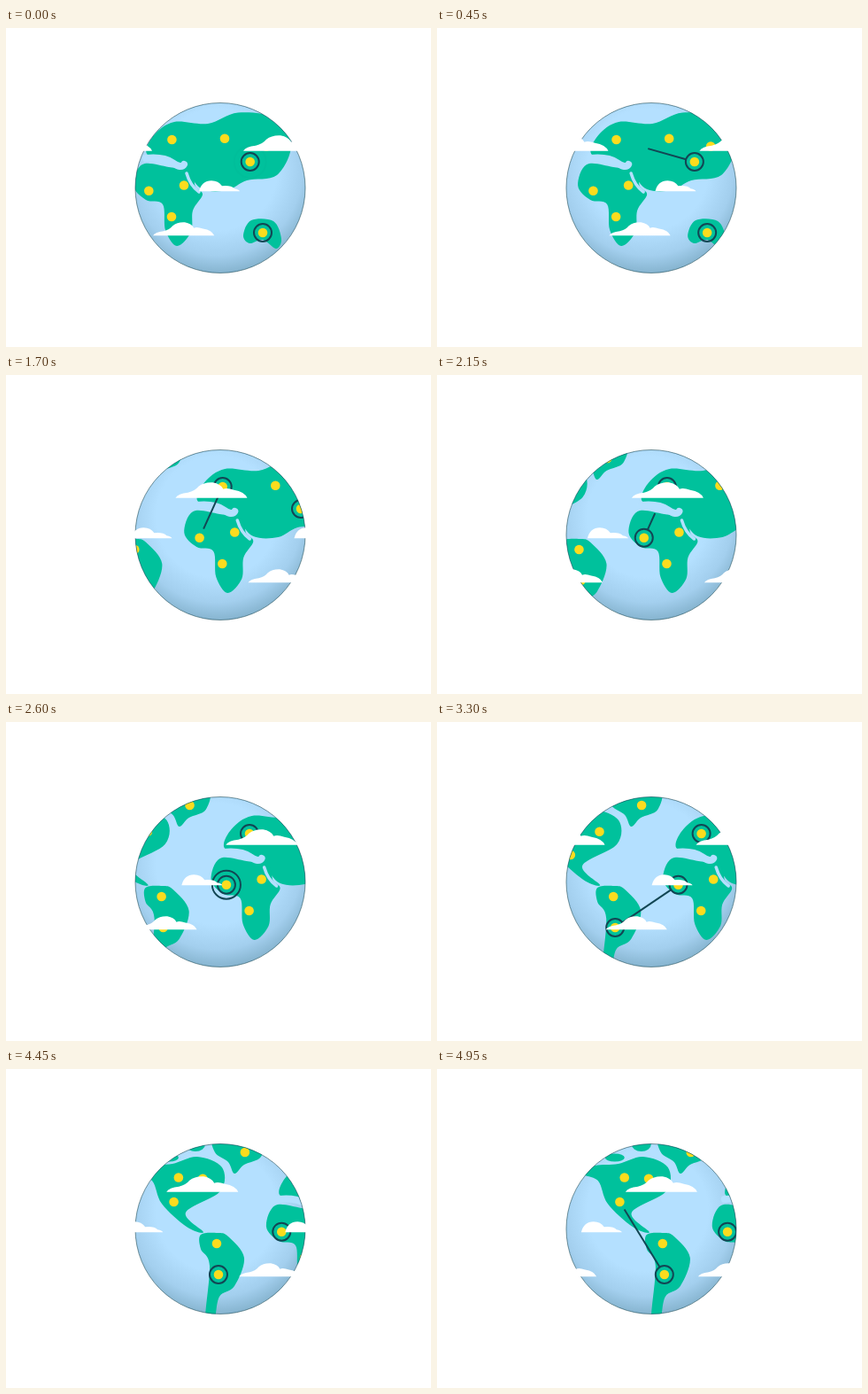
An HTML page with a canvas that plays this animation: 480x360 px, repeating every 5000 ms.

```html
<!DOCTYPE html>
<html lang="en">
<head>
<meta charset="utf-8">
<title>Spinning globe</title>
<style>
  html, body { margin: 0; width: 100%; height: 100%; overflow: hidden; background: #fff; }
  canvas { display: block; }
</style>
</head>
<body>
<canvas id="stage" width="480" height="360"></canvas>
<script>
const ctx = document.getElementById('stage').getContext('2d');
const LOOP = 5000, STEP = 50;
const MAP_SPEED = 0.0337, CLOUD_SPEED = 0.0632, CLOUD_GAP = 184;
const INK = '#124654', LAND = '#00c19c', SEA = '#b4e0ff', YELLOW = '#fbdc1e';
const DOT = 5.3, RING = 10, GROW = 450, HOLD = 200;
const RIPPLE_DELAY = 777, RIPPLE_TIME = 225;
const clamp = v => Math.max(0, Math.min(1, v));

// Smooth closed curve through a few key points, given as x, y, x, y...
function blob(...v) {
  const n = v.length / 2;
  const at = i => { i = (i + n) % n; return [v[2 * i], v[2 * i + 1]]; };
  const path = new Path2D();
  path.moveTo(...at(0));
  for (let i = 0; i < n; i++) {
    const [a, b, c, d] = [at(i - 1), at(i), at(i + 1), at(i + 2)];
    path.bezierCurveTo(
      b[0] + (c[0] - a[0]) / 6, b[1] + (c[1] - a[1]) / 6,
      c[0] - (d[0] - b[0]) / 6, c[1] - (d[1] - b[1]) / 6, ...c);
  }
  return path;
}

function ellipse(x, y, rx, ry = rx) {
  const path = new Path2D();
  path.ellipse(x, y, rx, ry, 0, 0, 2 * Math.PI);
  return path;
}

const eurasia = blob(159,142, 167,121, 190,106, 228,108, 262,95.5, 304,102, 322,132,
  306,166, 272,172, 250,183, 222,182, 204,163, 184,149);
const africa = blob(154,154, 184,157, 209,162, 214,179, 222,188, 211,206, 209,230,
  193,246, 180,228, 177,199, 158,194, 144,178);
const australia = blob(268,234, 277,217, 302,218, 311,238, 305,249, 290,239, 275,243);
const northAmerica = blob(-5,118, 12,109, 38,107, 66,99, 94,111, 92,138, 53,162, 73,184,
  54,178, 26,152, 15,126);
const southAmerica = blob(70,187, 89,185, 101,189, 119,213, 108,245, 91,257, 85,285,
  75,285, 80,222, 70,203);
const greenland = blob(87,76, 86,94, 101,105, 108,118, 119,108, 138,99, 139,76);
const lands = [eurasia, africa, australia, northAmerica, southAmerica, greenland,
  ellipse(34, 100, 11, 4.5), ellipse(64, 85, 11, 8)];

const mediterranean = new Path2D('M158 147Q178 145 188 152T201 154');
const redSea = new Path2D('M204 164Q208 178 218 185');

// Route stops: x, y, arrival time.
const stops = [
  [290, 231, -2000], [275.7, 151, -1000], [187.4, 126, 620],
  [161.3, 183.7, 1710], [90, 232, 3150], [39.6, 150, 4950]
];
const towns = [[247, 124.7], [294, 133.5], [201, 177.5], [187, 213],
  [44.9, 122.5], [72.3, 123.8], [88, 197], [119.9, 94]];

const bigCloud = new Path2D(
  'M0 0Q3-5 14-6Q22-8 26-13Q32-18 42-17.5Q51-16 54-10Q58-12 66-9Q78-7 81 0Z');
const smallCloud = new Path2D('M0 0Q3-12 14-12Q22-12 26-6Q36-7 40-3Q45-2 46 0Z');
const clouds = [[bigCloud, 84, 138.8, 1], [smallCloud, 218, 184.3, 1], [bigCloud, 166, 234.3, 0.855]];

const globe = ellipse(242, 180.5, 96);
const water = ctx.createRadialGradient(238, 160, 0, 238, 160, 118);
water.addColorStop(0.58, SEA);
water.addColorStop(0.82, '#a3cfee');
water.addColorStop(1, '#84b2cd');

function stroke(path, color, width) {
  ctx.strokeStyle = color;
  ctx.lineWidth = width;
  ctx.stroke(path);
}

// A stop's ring opens on arrival; later it ripples away and a new one follows.
function drawRings([x, y, arrive], time) {
  const ring = (r, open) => stroke(ellipse(x, y, r * open + 4 * (1 - open)), INK, 2);
  const u = (time - arrive - RIPPLE_DELAY) / RIPPLE_TIME;
  if (time <= arrive) return;
  if (u <= 0 || u >= 1) return ring(RING, clamp((time - arrive) / 150));
  const spread = 1 - (1 - u) ** 2;
  ring(RING, clamp(2 * spread - 0.5));
  ctx.globalAlpha = Math.min(1, 2 - 2 * u);
  ring(RING + 8 * spread, 1);
  ctx.globalAlpha = 1;
}

// The line grows towards the next stop, waits, then its tail follows.
function drawLeg([x1, y1], [x2, y2, arrive], time) {
  const head = clamp((time - arrive + GROW) / GROW);
  const tail = clamp((time - arrive - HOLD) / GROW);
  if (head <= tail) return;
  const dx = x2 - x1, dy = y2 - y1, length = Math.hypot(dx, dy);
  const point = k => {
    const f = (RING + k * (length - 2 * RING)) / length;
    return [x1 + dx * f, y1 + dy * f];
  };
  const line = new Path2D();
  line.moveTo(...point(tail));
  line.lineTo(...point(head));
  stroke(line, INK, 2);
}

function drawMap(time) {
  ctx.translate(time * MAP_SPEED, 0);
  ctx.fillStyle = LAND;
  lands.forEach(land => ctx.fill(land));
  ctx.lineCap = 'round';
  stroke(mediterranean, SEA, 8);
  stroke(redSea, SEA, 3.5);
  ctx.lineCap = 'butt';
  stops.forEach((stop, i) => {
    if (i) drawLeg(stops[i - 1], stop, time);
    drawRings(stop, time);
  });
  ctx.fillStyle = YELLOW;
  for (const [x, y] of [...stops, ...towns]) ctx.fill(ellipse(x, y, DOT));
}

function drawClouds(time) {
  ctx.fillStyle = '#fff';
  for (const [shape, start, y, scale] of clouds) {
    const x = (start + time * CLOUD_SPEED) % CLOUD_GAP;
    for (const left of [x, x + CLOUD_GAP]) {
      ctx.save();
      ctx.translate(left, y);
      ctx.scale(scale, scale);
      ctx.fill(shape);
      ctx.restore();
    }
  }
}

function draw() {
  const time = Math.floor(performance.now() % LOOP / STEP) * STEP;
  ctx.clearRect(0, 0, 480, 360);
  ctx.save();
  ctx.clip(globe);
  ctx.fillStyle = water;
  ctx.fill(globe);
  drawMap(time);
  ctx.restore();
  stroke(globe, 'rgba(18, 70, 84, 0.75)', 0.8);
  drawClouds(time);
  requestAnimationFrame(draw);
}
draw();
</script>
</body>
</html>
```
